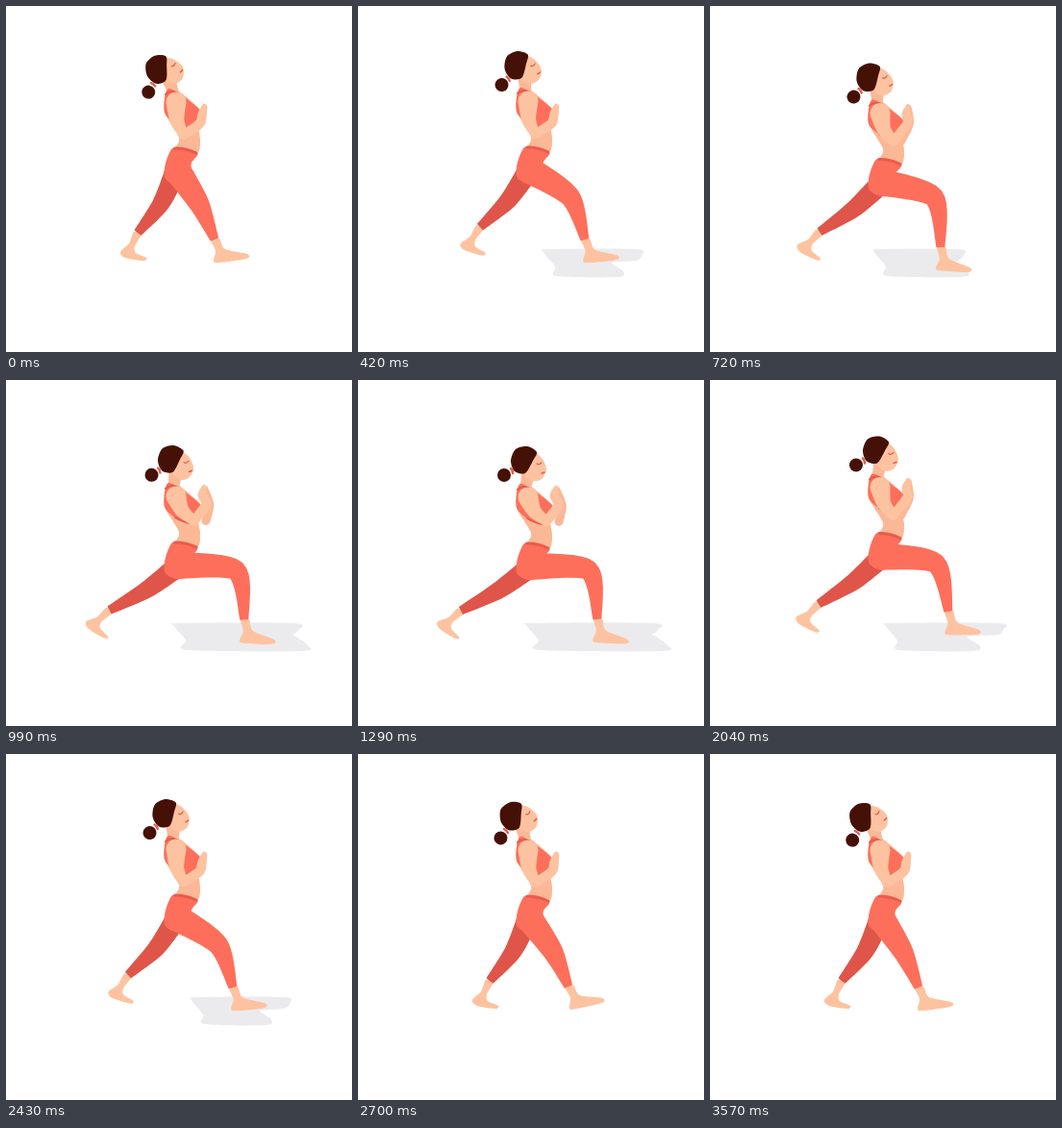
Write an HTML page with a canvas that moves like this. It is 360x360 px and loops after 3.6 s.

```html
<!DOCTYPE html>
<html lang="en">
<head>
<meta charset="utf-8">
<title>Lunge</title>
<style>
  html, body { margin: 0; width: 100%; height: 100%; overflow: hidden; background: #fff; }
  canvas { display: block; }
</style>
</head>
<body>
<canvas id="stage" width="360" height="360"></canvas>
<script>
const ctx = document.getElementById('stage').getContext('2d');
const LOOP = 3600, STEP = 30;
const SKIN = '#fdc3a0', SKIN_SHADE = '#fbb896', TIGHTS = '#fd6f5b', TIGHTS_SHADE = '#df5549',
      TRIM = '#e85b4d', HAIR = '#451106', SHADOW = '#ebebed';

// Only what the rules in render() cannot derive: body drop, head tilt, front leg, back ankle, shadow extents
const high = { drop: -1, tilt: -14, kneeX: 221, kneeY: 199, ankleX: 236, ankleY: 243, foot: 2,
  backX: 127, backY: 230, left: 193, right: 295, low: 276, alpha: 1 };
const stand = { ...high, drop: 0, tilt: -29, kneeX: 201, kneeY: 206, ankleX: 217, foot: 0,
  backX: 137, backY: 236, alpha: 0 };
const settle = { ...stand, tilt: -24, kneeX: 203, ankleX: 219, ankleY: 242, foot: -5 };
const down = { drop: 11.5, tilt: -14, kneeX: 233, kneeY: 199, ankleX: 240, ankleY: 251, foot: 11,
  backX: 114, backY: 235, left: 171, right: 264, low: 268, alpha: 1 };
const lunge = { drop: 22, tilt: 0, kneeX: 240, kneeY: 198, ankleX: 249, ankleY: 249, foot: 10,
  backX: 107, backY: 240, left: 176, right: 312, low: 322, alpha: 1 };
const up = { drop: 11.5, tilt: 0, kneeX: 235, kneeY: 191, ankleX: 248, ankleY: 241, foot: 7,
  backX: 113, backY: 233, left: 183, right: 305, low: 280, alpha: 1 };

const keys = [[0, stand], [300, high], [430, high], [720, down], [1080, lunge], [1680, lunge],
  [2040, up], [2300, high], [2430, high], [2700, settle], [3300, stand], [LOOP, stand]];

// Monotone cubic interpolation between key poses
function poseAt(t) {
  const k = keys.findIndex(key => key[0] > t) - 1;
  const [t0, a] = keys[k], [t1, b] = keys[k + 1], span = t1 - t0, u = (t - t0) / span;
  const slope = (n, part) => keys[n] && keys[n + 1]
    ? (keys[n + 1][1][part] - keys[n][1][part]) / (keys[n + 1][0] - keys[n][0]) : 0;
  const tangent = (n, part) => {
    const p = slope(n - 1, part), q = slope(n, part);
    return p * q > 0 ? 2 * p * q / (p + q) : 0;
  };
  const pose = {};
  for (const part in a) {
    pose[part] = a[part] + (b[part] - a[part]) * u * u * (3 - 2 * u)
      + span * u * (1 - u) * ((1 - u) * tangent(k, part) - u * tangent(k + 1, part));
  }
  return pose;
}

// Smooth closed curve through a flat list of points
function blob(color, p) {
  const n = p.length;
  ctx.fillStyle = color;
  ctx.beginPath();
  ctx.moveTo(p[0], p[1]);
  for (let i = 0; i < n; i += 2) {
    const x = j => p[(i + j + n) % n], y = j => x(j + 1);
    ctx.bezierCurveTo(x(0) + (x(2) - x(-2)) / 7, y(0) + (y(2) - y(-2)) / 7,
      x(2) - (x(4) - x(0)) / 7, y(2) - (y(4) - y(0)) / 7, x(2), y(2));
  }
  ctx.fill();
}

function disc(color, x, y, r) {
  ctx.fillStyle = color;
  ctx.beginPath();
  ctx.arc(x, y, r, 0, 7);
  ctx.fill();
}

function line(color, width, x1, y1, cx, cy, x2, y2) {
  ctx.strokeStyle = color;
  ctx.lineWidth = width;
  ctx.beginPath();
  ctx.moveTo(x1, y1);
  ctx.quadraticCurveTo(cx, cy, x2, y2);
  ctx.stroke();
}

// Limb with a bent centre line through [x, y, radius] joints; round start, flat end
function limb(color, joints) {
  const spine = [], sides = [[], []], last = joints.length - 1;
  const joint = i => joints[Math.max(0, Math.min(last, i))];
  for (let s = 0; s <= last * 10; s++) {
    const i = Math.floor(s / 10), u = s / 10 - i;
    spine.push([0, 1, 2].map(c => {
      const [a, b, d, e] = [-1, 0, 1, 2].map(j => joint(i + j)[c]);
      return b + (d - b) * u * u * (3 - 2 * u) + .4 * u * (1 - u) * ((1 - u) * (d - a) - u * (e - b));
    }));
  }
  spine.forEach(([x, y, r], i) => {
    const [px, py] = spine[Math.max(0, i - 1)], [qx, qy] = spine[Math.min(spine.length - 1, i + 1)];
    const d = Math.hypot(qx - px, qy - py), nx = (py - qy) / d * r, ny = (qx - px) / d * r;
    sides[0].push([x + nx, y + ny]);
    sides[1].unshift([x - nx, y - ny]);
  });
  disc(color, ...joints[0]);
  ctx.beginPath();
  sides.flat().forEach(point => ctx.lineTo(...point));
  ctx.fill();
}

function placed(x, y, degrees, draw) {
  ctx.save();
  ctx.translate(x, y);
  ctx.rotate(degrees * Math.PI / 180);
  draw();
  ctx.restore();
}

const frontFoot = () => blob(SKIN, [-4,0, 1,12, -1,22, 4,24, 33,20, 34,15, 11,10, 5,-1]);
const backFoot = () => blob(SKIN, [-4,-1, -9,11, -18,20, -13,26, 6,29, 9,26, -2,21, -3,14, 4,1]);

// Drawn around the base of the neck
function head() {
  limb(SKIN_SHADE, [[2, 8, 5.5], [5, -8, 7]]);
  blob(SKIN, [8,-32, 19,-25, 24,-13, 19,-3, 9,-1, 0,-10, 0,-24]);
  disc(HAIR, -20, -7, 7);
  line(TRIM, 2.5, -13, -14, -11, -12, -11, -9);
  blob(HAIR, [-13,-22, -8,-34, 4,-37, 14,-31, 10,-22, 2,-9, -9,-11]);
  line(TRIM, 1.2, 14, -19, 16, -17, 19, -20);
  line(TRIM, 1.5, 19, -9, 20, -9, 22, -10);
}

function torso() {
  blob(SKIN_SHADE, [168,87, 179,88, 203,110, 200,125, 202,139, 199,153, 177,149, 180,137, 165,110]);
  blob(TIGHTS, [166,91, 173,87, 203,109, 200,124, 191,128, 176,122, 165,111]);
  line(TRIM, 2, 166, 92, 172, 86, 181, 92);
  line(TRIM, 2, 176, 122, 184, 127, 192, 128);
}

function hips() {
  blob(TIGHTS, [176,147, 199,153, 193,163, 191,174, 179,186, 166,180, 165,169, 169,155]);
  line(TRIM, 3, 176, 148, 188, 148, 198, 153);
}

function shadow({ left, right, low, alpha }) {
  ctx.globalAlpha = alpha;
  blob(SHADOW, [left,256, left + 7,253, right - 5,253, right,260, right - 6,265, low - 12,267,
    low,276, low - 6,282, left + 14,281, left + 12,271]);
  ctx.globalAlpha = 1;
}

function render(t) {
  const pose = poseAt(t), { drop, tilt, ankleX, ankleY, backX, backY } = pose;
  const elbowX = 185 + drop / 2, elbowY = 134 + drop * .6;
  const handX = 206, handY = 104 + Math.max(0, drop - 11) * .75;
  const spread = elbowX - 183, wristX = handX + (elbowX - 192) * .6;

  ctx.fillStyle = '#fff';
  ctx.fillRect(0, 0, 360, 360);
  shadow(pose);
  placed(backX, backY, (137 - backX) * .75, backFoot);
  limb(TIGHTS_SHADE, [[175, 176 + drop, 11],
    [(175 + backX) / 2 + 5, (176 + drop + backY) / 2, 9], [backX, backY, 4.5]]);
  limb(SKIN_SHADE, [[elbowX + spread, elbowY, 4.5], [wristX + spread / 3, handY + 18, 4], [handX + 1, handY, 2.5]]);
  placed(172 + tilt * .1, 84 + drop - tilt * .07, tilt, head);
  placed(0, drop, 0, torso);
  placed(ankleX, ankleY, pose.foot, frontFoot);
  limb(TIGHTS, [[179, 172 + drop, 14], [pose.kneeX, pose.kneeY, 10.5], [ankleX, ankleY, 4.5]]);
  placed(0, drop, 0, hips);
  limb(SKIN, [[177, 100 + drop, 10.5], [(177 + elbowX) / 2 - 3, (104 + drop + elbowY) / 2, 7.5], [elbowX, elbowY, 5]]);
  limb(SKIN, [[elbowX, elbowY, 5], [wristX, handY + 18, 5], [handX - 2, handY + 8, 4.5], [handX + 1, handY - 2, 2]]);
}

function tick(now) {
  render(Math.floor(now % LOOP / STEP) * STEP);
  requestAnimationFrame(tick);
}
ctx.lineCap = 'round';
tick(performance.now());
</script>
</body>
</html>
```
